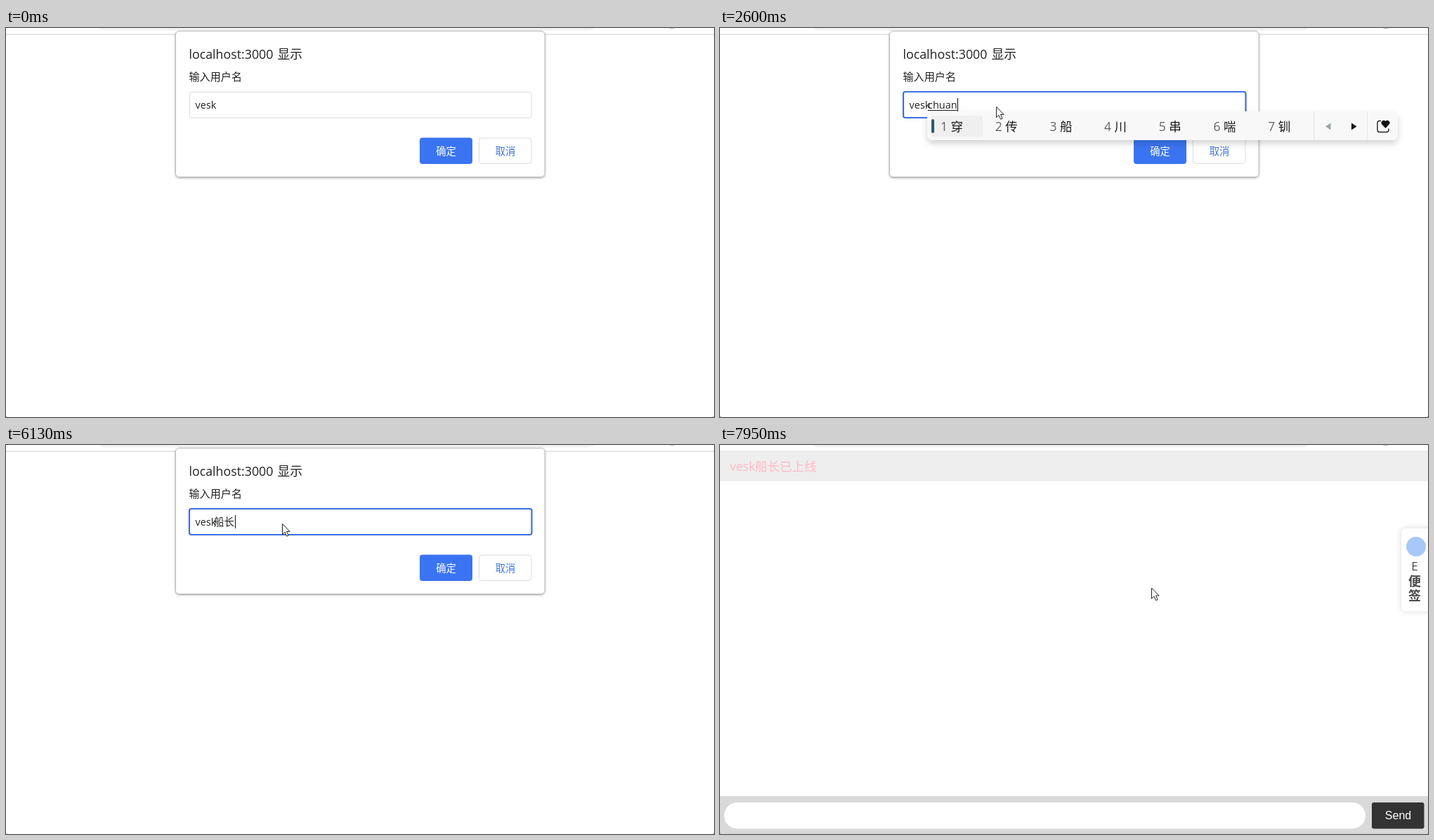
An HTML page for the animation above (8 s loop, 1008x555 px).

```html
<!DOCTYPE html>
<html lang="zh-CN">
<head>
<meta charset="utf-8">
<title>Prompt</title>
<style>
html, body { margin: 0; width: 100%; height: 100%; overflow: hidden; background: #fff; }
svg { display: block; width: 100vw; height: 100vh; }
text { font-family: 'Open Sans', 'Noto Sans CJK SC', 'Noto Sans CJK', sans-serif; fill: #222; white-space: pre; }
.field { font-size: 14.5px; }
.mid { text-anchor: middle; }
.num { font-size: 17.5px; fill: #666; }
.cand { font-size: 17.5px; fill: #1a1a1a; }
.send { font: 16px 'Liberation Sans', Arial, sans-serif; fill: #fff; }
.side { font-size: 18px; font-weight: 700; fill: #444; }
</style>
</head>
<body>
<svg viewBox="0 0 1008 555">
  <defs>
    <filter id="soft" x="-10%" y="-10%" width="120%" height="130%">
      <feDropShadow dx="0" dy="1" stdDeviation="1.8" flood-opacity=".38"/>
    </filter>
    <filter id="float" x="-10%" y="-50%" width="120%" height="220%">
      <feDropShadow dx="0" dy="5" stdDeviation="4.5" flood-opacity=".17"/>
    </filter>
    <filter id="glow" x="-40%" y="-20%" width="180%" height="140%">
      <feDropShadow dx="0" dy="0" stdDeviation="4" flood-opacity=".16"/>
    </filter>
  </defs>
  <rect width="1008" height="555" fill="#fff"/>
  <rect x="128" y="-30" width="714" height="33.5" rx="14" fill="#f1f1f2"/>
  <ellipse cx="948" cy="-1" rx="5" ry="2" fill="#bbb"/>
  <rect y="8.5" width="1008" height="1.4" fill="#dcdcdc"/>

  <g id="chat">
    <rect y="501" width="1008" height="54" fill="#d9d9d9"/>
    <rect x="6" y="510" width="913" height="37.5" rx="18.7" fill="#fff"/>
    <rect x="928" y="510" width="74.5" height="37.5" rx="3" fill="#333"/>
    <text class="send mid" x="965.5" y="533.5">Send</text>
  </g>
  <g id="online">
    <rect y="9.5" width="1008" height="42" fill="#eee"/>
    <text x="14" y="37.3" style="font-size:17.5px;fill:#ffb9c6">vesk船长已上线</text>
    <rect x="970.5" y="119" width="60" height="118" rx="6" fill="#fff" filter="url(#glow)"/>
    <circle cx="991" cy="145" r="14" fill="#a9c8fa"/>
    <text class="side mid" x="989" y="179" style="font-size:17px;font-weight:400">E</text>
    <text class="side mid" x="989" y="201">便</text>
    <text class="side mid" x="989" y="222">签</text>
  </g>

  <g id="dialog">
    <rect x="241.5" y="4.5" width="525.5" height="208" rx="5" fill="#fff" stroke="#bdbdbd" filter="url(#soft)"/>
    <text x="260.5" y="44" style="font-size:17.8px">localhost:3000</text>
    <text x="386.5" y="44" style="font-size:17.8px">显示</text>
    <text x="260.5" y="75.3" style="font-size:15.1px">输入用户名</text>
    <rect id="box" x="261.5" y="91.5" width="486.5" height="36.5" rx="2" fill="#fff" stroke="#dcdcdc"/>
    <rect id="ring" x="261" y="91" width="487.5" height="37" rx="3" fill="#fff" stroke="#3a70e0" stroke-width="2.2"/>
    <text class="field" x="269.5" y="115">vesk</text>
    <text class="field" id="typed" x="296" y="115"></text>
    <rect id="under" x="296" y="117" height="1.1" fill="#222"/>
    <rect id="caret" y="100" width="1" height="19" fill="#111"/>
    <rect id="ok" x="589" y="156.5" width="75" height="37.5" rx="4"/>
    <text class="mid" x="626.5" y="181" style="font-size:14.3px;fill:#fff">确定</text>
    <rect x="673.5" y="157" width="74.5" height="36.5" rx="4" fill="#fff" stroke="#dadce0"/>
    <text class="mid" x="711" y="181" style="font-size:14.3px;fill:#3b73e6">取消</text>
  </g>

  <g id="ime">
    <rect id="bar" x="295" y="119" height="41" rx="8" fill="#f8f8f8" filter="url(#float)"/>
    <rect x="300.5" y="125" width="73.5" height="30.5" rx="4" fill="#efefef"/>
    <rect x="301" y="130" width="4" height="20" rx="2" fill="#2f5878"/>
    <g id="cells"></g>
    <g id="tools">
      <path d="M845.5 119v41M921.5 119v41" stroke="#e6e6e6"/>
      <path d="M862 140.5l7.5-5v10z" fill="#9ba6a3"/>
      <path d="M906.5 140.5l-7.5-5v10z" fill="#111"/>
      <path d="M941 132.5h-2q-3 0-3 3v10q0 3 3 3h10q3 0 3-3v-2" fill="none" stroke="#222" stroke-width="1.4"/>
      <path d="M947.5 143l-5-5.3a3.4 3.4 0 0 1 5-4.7a3.4 3.4 0 0 1 5 4.7z" fill="#111"/>
    </g>
  </g>

  <path d="M0 552q0 3 3 3H0zM1008 552q0 3-3 3h3z" fill="#aaa"/>
  <g id="pointer">
    <circle id="click" r="14" fill="#ebdc32" fill-opacity=".65"/>
    <path d="M.5.5v15.2l3.5-3.3 2.6 5.8 2.5-1.1-2.6-5.7h4.6z" fill="#fff" stroke="#222" stroke-linejoin="round"/>
  </g>
</svg>
<script>
const $ = id => document.getElementById(id);
const LOOP = 8000, STEP = 69, PITCH = 77.7;

// [time, pinyin, candidates]
const typing = [
  [1880, "c", "从 才 吃 出 陈 成 车"],
  [2210, "ch", "吃 出 成 车 陈 长 场"],
  [2340, "chu", "出 处 除 楚 初 触 储"],
  [2540, "chua", "穿 传 船 川 揣 串 欻"],
  [2600, "chuan", "穿 传 船 川 串 喘 钏"],
  [2820, "chuang", "床 创 窗 闯 疮 幢 撞"],
  [3260, "chuang", "床 窗 创 闯 疮 幢 窗户"],
  [3810, "chuang'z", "床在 床 创 窗 闯 疮 幢"],
  [3940, "chuang'zh", "床中 床 创 窗 闯 疮 幢"],
  [4080, "chuang'zha", "床炸 床 创 窗 闯 疮 幢"],
  [4210, "chuang'zhan", "床站 床 创 窗 闯 疮 幢"],
  [4270, "chuang'zhang", "船长 船长室 船长们 船长好 床 创 窗"],
  [5070, "船长", ""]
];
// Times at which the caret turns on or off, starting with on
const blinks = [820, 1350, 1880, 3260, 3810, 4800, 5070, 5600, 6130, 6660, 7190];

const show = (id, on) => $(id).style.display = on ? "" : "none";
const within = (t, a, b) => t >= a && t < b;
const mix = (a, b, k) => a + (b - a) * k;
const bezier = (p, k) => {
  while (p.length > 1) p = p.slice(1).map((q, i) => [mix(p[i][0], q[0], k), mix(p[i][1], q[1], k)]);
  return p[0];
};
// Progress 0..1 in ten equal ticks
const ticks = (t, start) => Math.min(10, Math.floor((t - start) / STEP)) / 10;

function pointerAt(t) {
  if (t < 820) {
    const k = ticks(t, 130);
    return bezier([[888, 516], [700, 330], [430, 130], [393, 112]], 1 - (1 - k) ** 1.5);
  }
  if (t < 6380) return [393, 112];
  if (t < 6520) return [412, 133];
  if (t < 7890) {
    const k = (ticks(t, 6520) * 10 + 1) / 11;
    return bezier([[412, 133], [470, 50], [590, 90], [621, 167]], k);
  }
  return t < 7950 ? [617, 190] : [614, 203.5];
}

let shown = null;
function drawCandidates(list) {
  if (list === shown) return;
  shown = list;
  let x = 314, html = "";
  list.split(" ").forEach((word, i) => {
    html += `<text class="num" x="${x}" y="147">${i + 1}</text><text class="cand" x="${x + 14.5}" y="147.3">${word}</text>`;
    x += PITCH + Math.max(0, word.length - 2) * 17.5;
  });
  const extra = x - 314 - PITCH * 7;
  $("cells").innerHTML = html;
  $("bar").setAttribute("width", 670 + extra);
  $("tools").setAttribute("transform", `translate(${extra})`);
}

function draw(t) {
  const entry = typing.filter(e => e[0] <= t).pop() || [0, "", ""];
  const [, word, list] = entry;
  const open = list !== "";
  show("dialog", t < 7480);
  show("chat", t >= 7550);
  show("online", t >= 7620);
  show("ring", t >= 820);
  show("box", t < 820);

  $("typed").textContent = word;
  const width = word && t < 7480 ? $("typed").getComputedTextLength() : 0;
  show("under", open);
  $("under").setAttribute("width", width);
  show("caret", blinks.filter(b => b <= t).length % 2);
  $("caret").setAttribute("x", Math.round(296.6 + width));

  show("ime", open);
  if (open) drawCandidates(list);

  const [x, y] = pointerAt(t);
  const hover = within(x, 589, 664) && within(y, 156, 194);
  $("ok").setAttribute("fill", hover ? "#4f80ec" : "#3b74f2");
  show("pointer", t >= 130);
  show("click", within(t, 820, 950) || within(t, 7330, 7480));
  $("pointer").setAttribute("transform", `translate(${x} ${y})`);
}

function tick() {
  draw(performance.now() % LOOP);
  requestAnimationFrame(tick);
}
tick();
</script>
</body>
</html>
```
